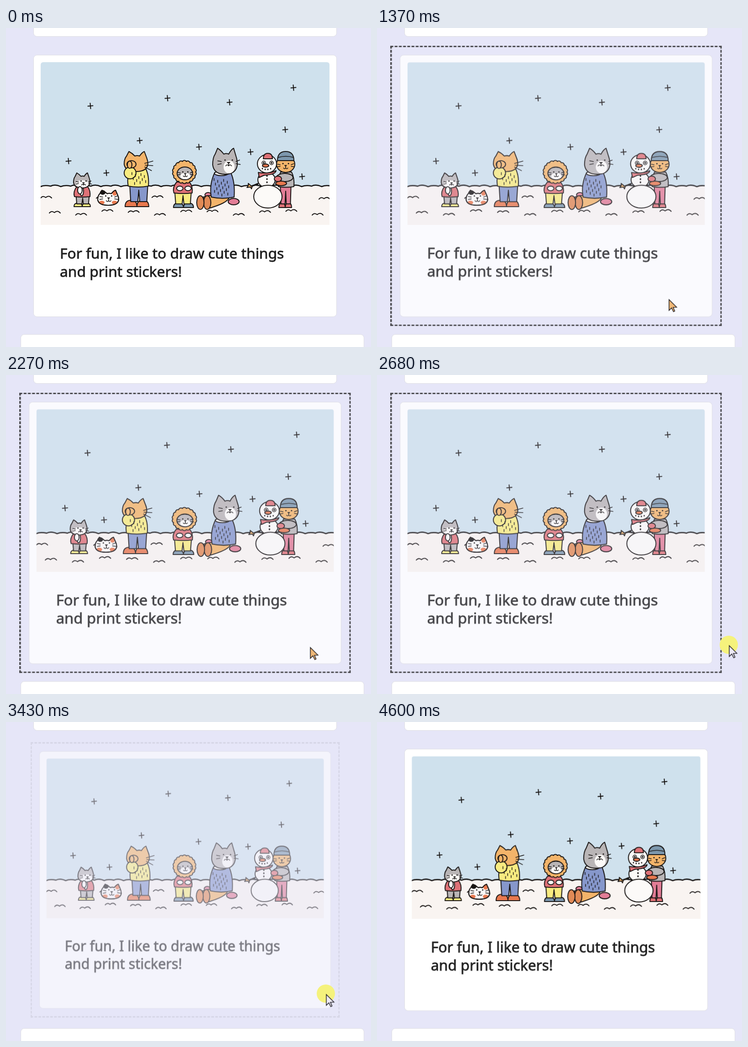
Write an HTML page that moves like this. It is 800x700 px and loops after 5000 ms.

```html
<!DOCTYPE html>
<html lang="en">
<head>
<meta charset="utf-8">
<title>Sticker card</title>
<style>
  html, body { margin: 0; width: 100%; height: 100%; overflow: hidden; background: #e6e6f8; }
  #stage { position: relative; width: 800px; height: 700px; overflow: hidden; background: #e6e6f8; }
  .card { position: absolute; box-sizing: border-box; background: #fff; border: 1px solid #dfdfe4; border-radius: 8px; }
  #above { left: 60px; top: -60px; width: 665px; height: 79px; }
  #below { left: 32px; top: 672px; width: 753px; height: 80px; }
  #card { left: 60px; top: 59px; width: 665px; height: 575px; }
  #card svg { position: absolute; left: -1px; top: -1px; }
  #ring { position: absolute; inset: -21px; border: 3px dashed #222; opacity: 0; }
  #cursor { position: absolute; left: 0; top: 0; overflow: visible; }
  #scene path { vector-effect: non-scaling-stroke; stroke-linecap: round; stroke-linejoin: round; }
  text { font: 31.8px "Noto Sans", "Open Sans", sans-serif; fill: #212121; stroke: #212121; stroke-width: .8px; }
</style>
</head>
<body>
<div id="stage">
  <div class="card" id="above"></div>
  <div class="card" id="below"></div>
  <div class="card" id="card">
    <svg width="665" height="575" viewBox="60 59 665 575">
      <clipPath id="frame"><path d="M76 432V81q0-6 6-6H703q6 0 6 6V432z"/></clipPath>
      <g id="scene" clip-path="url(#frame)"></g>
      <text x="118" y="506">For fun, I like to draw cute things</text>
      <text x="118" y="545.5">and print stickers!</text>
    </svg>
    <div id="ring"></div>
  </div>
  <svg id="cursor" width="1" height="1">
    <circle id="halo" cx="-1" cy="-2" r="20" fill="#f5f27c"/>
    <path id="arrow" transform="scale(1.4)" stroke="#17151a" d="M0 0V17L4 13L7 19L9 18L6.500 12H12z"/>
  </svg>
</div>
<script>
const LOOP = 5000;
const $ = id => document.getElementById(id);
const INK = '#171413', WHITE = '#fcfaf8', GREY = '#b9b5b6', ORANGE = '#f3b46a', YELLOW = '#f8eb80', RED = '#df7277',
  PINK = '#e27d96', BLUE = '#8697cb', STEEL = '#7c97ad', RUST = '#e9794f';

// Outlines on a grid from -10 to 10
const OVAL = 'M-10 0A10 10 0 1 1 10 0A10 10 0 1 1-10 0z';
const HEAD = 'M-10 2Q-10-4-8-7L-6-12Q-3-10-1-7Q1-8 3-7Q5-11 7-12L9-5Q10-2 10 2Q9 10 0 10T-10 2z';
const COAT = 'M-7-10Q-12 0-10 10Q0 12 10 10Q11-2 7-10z';
const PANTS = 'M-9-10H9L8 10H1L0-4L-1 10H-8z';
const DOME = 'M-10 10Q-10-10 0-10T10 10z';

let art = '';
const draw = (d, fill = 'none', width = 2, place = '') =>
  art += `<path d="${d}" fill="${fill}" stroke="${INK}" stroke-width="${width}" ${place}/>`;
const shape = (d, x, y, rx, ry, fill, width = 2) =>
  draw(d, fill, width, `transform="translate(${x} ${y}) scale(${rx / 10} ${ry / 10})"`);
const oval = (...spec) => shape(OVAL, ...spec);
const patch = (x, y, rx, ry, fill) => oval(x, y, rx, ry, fill, 0);
const shoes = (x, y, r, h, fill) => {
  for (const side of [1, -1]) shape(DOME, x + side * r, y, r, h, fill);
};
const knit = (x, y, w, h, count) => {
  for (let i = 0; i < count; i++) draw(`M${x + w * (i * 1.236 % 2 - 1)} ${y + h * (2 * i / count - 1)}v5`, 'none', 1.5);
};
// mood: 1 smiles, -1 frowns
const face = (x, y, size, mood) => {
  shape('M-5-2h.1M5-2h.1', x, y, size, size, 'none', 3);
  shape('M-2 1h4L0 3z', x, y, size, size, INK, 1);
  shape(`M-4 6q2 ${3 * mood} 4 0q2 ${3 * mood} 4 0M0 3v3M10 0l5-2M10 3l6 1M-10 0l-5-1M-10 3l-5 1`, x, y, size, size, 'none', 1.5);
};

function scenery() {
  draw('M76 75H710V350H76z', '#cfe1ed', 0);
  draw('M76 347H710V432H76z', '#f9f4f1', 0);
  let ridge = 'M76 348';
  for (let i = 0; i < 29; i++) ridge += `q${8 + i % 3}${-4 - i % 2} 22 ${i % 2 ? 1 : -1}`;
  draw(ridge, 'none', 2.6);
  const stars = [[185, 171], [354, 154], [490, 163], [630, 131], [293, 247], [423, 261],
    [536, 272], [137, 292], [220, 318], [612, 223], [649, 326]];
  for (const [x, y] of stars) draw(`M${x - 5.5} ${y + .5}l11-1M${x - .5} ${y - 6}l1 12`);
  const tuft = (x, y) => draw(`M${x - 12} ${y + 1}q5-6 11-1q7-6 13 1`);
  for (let i = 0; i < 11; i++) tuft(107 + 57.6 * i, 405 + 5 * Math.sin(2 * i));
  for (let i = 0; i < 6; i++) tuft(88 + 122 * i, 372 + 4 * Math.sin(3 * i));
}

function smallCat() {
  shoes(167, 388, 9, 4, YELLOW);
  shape(PANTS, 168, 377, 16, 9, GREY);
  shape(COAT, 167, 359, 17, 11, RED);
  oval(166, 358, 4, 10, WHITE);
  shape(HEAD, 166, 336, 18, 15, GREY);
  patch(167, 342, 14, 8, WHITE);
  face(170, 338, 11, -1);
  oval(162, 356, 5, 8, WHITE);
}

function calico() {
  shape(HEAD, 224, 374, 23, 15, WHITE);
  patch(238, 362, 5, 6, RUST);
  patch(212, 361, 6, 5, INK);
  patch(210, 383, 6, 4, RUST);
  patch(238, 383, 6, 4, RUST);
  shape(HEAD, 224, 374, 23, 15, 'none');
  face(225, 371, 13, 1);
}

function cryingCat() {
  shoes(287, 385, 13, 7, RUST);
  shape(PANTS, 291, 363, 22, 18, BLUE);
  shape(COAT, 290, 327, 22, 20, YELLOW);
  shape(HEAD, 285, 295, 26, 20, ORANGE);
  oval(272, 318, 13, 13, YELLOW);
  oval(275, 299, 10, 8, ORANGE);
  oval(271, 300, 5, 8, ORANGE);
  draw('M304 297l18-5M305 301l17 1M304 305l15 8', 'none', 1.5);
  knit(292, 329, 16, 12, 11);
}

function lionHood() {
  shoes(389, 389, 11, 5, STEEL);
  shape(PANTS, 388, 373, 20, 13, YELLOW);
  shape(COAT, 388, 350, 20, 12, RED);
  const lobes = 18;
  let mane = '';
  for (let i = 0; i <= lobes; i++) {
    const a = i / lobes * 2 * Math.PI;
    mane += `${i ? 'A5 5 0 0 1' : 'M'} ${391 + 24.5 * Math.cos(a)} ${316 + 23.5 * Math.sin(a)}`;
  }
  draw(mane + 'z', ORANGE);
  oval(392, 319, 17, 14, GREY);
  patch(393, 325, 11, 7, WHITE);
  face(393, 318, 11, 1);
  for (const x of [381, 399]) oval(x, 352, 7, 5, WHITE);
}

function seatedCat() {
  oval(499, 381, 12, 7, PINK);
  oval(443, 366, 7, 5, PINK);
  draw('M432 371Q470 360 490 370Q488 384 440 397z', ORANGE);
  for (const x of [441, 426]) oval(x, 383, 8, 15, '#e18a56');
  shape(COAT, 475, 344, 25, 27, BLUE);
  knit(473, 348, 17, 18, 18);
  oval(472, 319, 15, 5, WHITE);
  shape(HEAD, 480, 295, 27, 26, GREY);
  patch(489, 305, 12, 14, WHITE);
  face(488, 293, 16, -1);
}

function snowmanHug() {
  shoes(612, 389, 7, 5, RED);
  shape(PANTS, 613, 366, 13, 20, PINK);
  shape(COAT, 614, 332, 17, 16, GREY);
  draw('M552 341l-14 6-7-6v5l-3 4 8-1 2 4 2-6 12-4z', ORANGE);
  oval(571, 333, 19, 17, WHITE);
  oval(574, 370, 31, 25, WHITE);
  oval(572, 298, 21, 20, WHITE);
  shape(DOME, 574, 281, 10, 6, RED);
  draw('M553 317Q574 321 592 313Q591 322 566 323L555 328z', RED);
  for (const x of [565, 582]) {
    oval(x, 296, 4, 4, WHITE, 1.5);
    patch(x, 296, 2, 2, INK);
  }
  oval(569, 302, 7, 3.5, RUST);
  for (let i = 0; i < 4; i++) {
    draw(`M${562 + 6 * i} ${308 + 2 * Math.sin(i)}v1`, 'none', 2.5);
    if (i) draw(`M572 ${317 + 7 * i}v1`, 'none', 3);
  }
  oval(613, 299, 20, 18, ORANGE);
  shape(DOME, 613, 281, 18, 10, STEEL);
  draw('M597 284Q613 279 630 284', 'none', 1.5);
  face(613, 300, 12, 1);
  oval(611, 328, 18, 9, GREY);
  oval(603, 341, 12, 5, RUST);
  oval(596, 331, 8, 6, RED);
}

[scenery, smallCat, calico, cryingCat, lionHood, seatedCat, snowmanHug].forEach(part => part());
$('scene').innerHTML = art;

// Motion: each step [start, ...values] eases from the step before it
function play(el, steps, toFrame, span = 230) {
  const frame = (t, [, ...v]) => ({ offset: t / LOOP, easing: 'ease-in-out', ...toFrame(...v) });
  const last = steps[steps.length - 1];
  const frames = [frame(0, last)];
  steps.forEach((step, i) => frames.push(frame(step[0], steps[i - 1] || last), frame(step[0] + span, step)));
  frames.push(frame(LOOP, last));
  el.animate(frames, { duration: LOOP, iterations: Infinity });
}

const rest = { scale: '1, 1', alpha: 1, ring: 0 };
const hover = { scale: '1.03, 1', alpha: .8, ring: 1 };
const press = { scale: '.949, .979', alpha: .5, ring: 0 };
const states = [[90, hover], [510, rest], [760, hover], [1370, press], [1920, hover],
  [2800, rest], [3040, hover], [3190 + 80, press], [3560, hover], [3790, rest]];
const quick = 150;
play($('card'), states, s => ({ transform: `scale(${s.scale})`, opacity: s.alpha }), quick + 70 > 230 ? quick : 220);
play($('ring'), states, s => ({ opacity: s.ring }), 220);

play($('cursor'), [[90, 705, 600], [350, 820, 606], [700, 640, 596], [1950, 667, 598], [2440, 772, 594],
  [3025, 702, 598], [3560, 762, 602], [3990, 784, 662], [4460, 830, 720]],
  (x, y) => ({ transform: `translate(${x}px, ${y}px)` }));

const clicks = [[1440, 1], [1920, 0], [2470, 1], [2880, 0], [3270, 1], [3560, 0]];
play($('halo'), clicks, on => ({ opacity: on }), 1);
play($('arrow'), clicks, on => ({ fill: on ? '#eeebf6' : '#efb878' }), 1);
</script>
</body>
</html>
```
